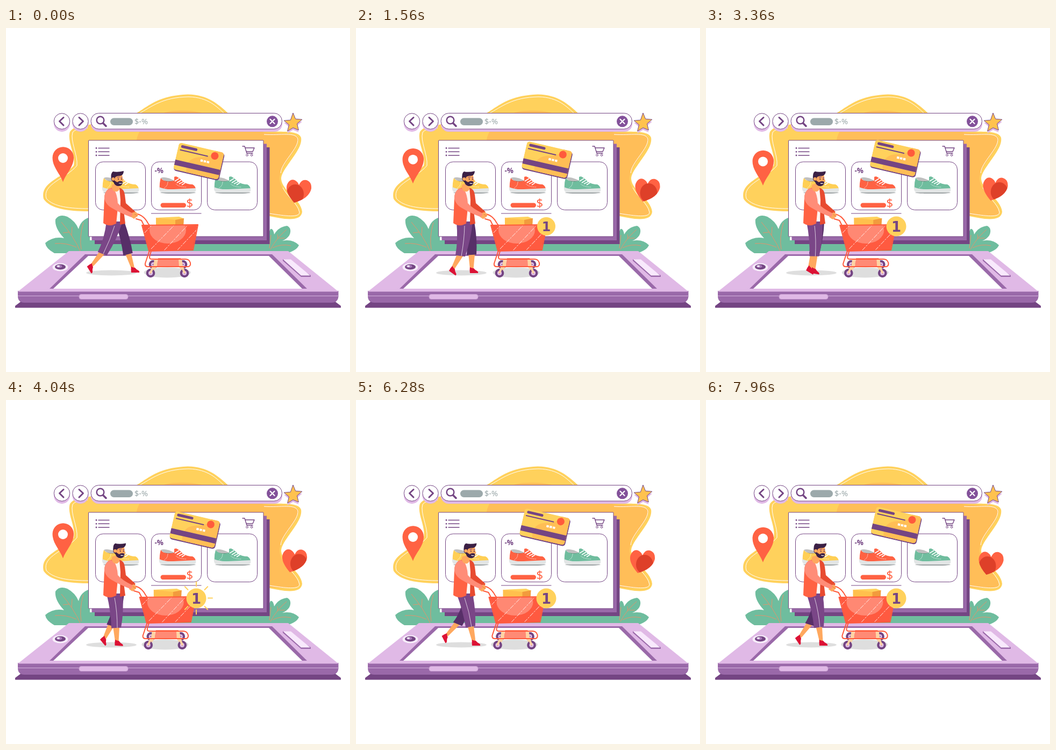
An HTML page for the animation above (8000 ms loop, 640 by 640 pixels).

```html
<!DOCTYPE html>
<html lang="en">
<head>
<meta charset="utf-8">
<title>Online shopping</title>
<style>
html,body{margin:0;width:100%;height:100%;overflow:hidden;background:#fff}
svg{display:block;width:100%;height:100%}
text{font-family:"Noto Sans","Open Sans",sans-serif}
.line{fill:none;stroke:#744583;stroke-linecap:round;stroke-linejoin:round}
.box{fill:#fff;stroke:#744583}
.lilac{fill:#e0b9e6}.mid{fill:#9a69a9}.deep{fill:#744583}
.red{fill:#ff6243}.skin{fill:#ffa85e}.hair{fill:#3b2045}
.tube{fill:none;stroke:#ff5a3c;stroke-width:2;stroke-linejoin:round;stroke-linecap:round}
.thin{fill:none;stroke:#fff;stroke-width:1}
.vein{fill:none;stroke:#e5936c;stroke-width:1}
</style>
</head>
<body>
<svg viewBox="0 0 640 640">
<defs>
  <g id="sneaker">
    <ellipse cx="320" cy="306.5" rx="33" ry="1.6" fill="#9aa0a2"/>
    <path d="M288 279Q294 288 313 284L313 277Q317 275 320 278Q325 281 329 286Q337 291 347 291Q353 294 353 301L286 300Q285 289 288 279Z" fill="currentColor"/>
    <path d="M288 279Q296 275 313 284Q298 290 288 279Z" fill="#000" opacity=".25"/>
    <path d="M285 296Q296 301 312 300Q332 299 353 298Q355 306 347 306H291Q284 305 285 296Z" fill="#e2e5e5"/>
    <path d="M314 285l8-5M318 288l8-5M322 290l8-4M327 292l6-4" stroke="#fff" stroke-width="1.6"/>
    <path d="M301 286Q301 294 294 298M316 290Q322 296 336 296" class="thin" stroke-dasharray="2 1" opacity=".75"/>
  </g>
  <path id="star" d="M534 158l4.6 11.2 12.2 1-9.3 7.9 2.9 11.8L534 185.600l-10.400 6.300 2.900-11.800-9.300-7.900 12.200-1Z"/>
  <g id="wheel">
    <circle r="8.300" class="deep"/><circle r="4" fill="#e6c6ec"/><circle r="1.700" class="mid"/>
  </g>
  <path id="foot" d="M-3-3Q0-1 4-1Q7 3 11 4.500Q13 6 12 8H-3Q-4 2-3-3Z" fill="#dc1235"/>
  <path id="heartShape" d="M536 325Q518 304 523 291Q528 280 537 283Q543 286 545 292Q550 281 559 283Q569 286 568 299Q564 317 536 325Z"/>
  <clipPath id="heartClip"><use href="#heartShape"/></clipPath>
  <clipPath id="cardClip"><rect x="-43" y="-25.500" width="86" height="51" rx="5"/></clipPath>
  <clipPath id="basketClip"><path d="M254 368L356 367L347 413L267 415Z"/></clipPath>
</defs>

<!-- backdrop -->
<path fill="#ffd15c" d="M240 160C268 144 282 126 338 123.500C376 124 395 142 415 160L480 192C514 194 544 190 549 204C553 228 511 262 512 281C514 304 549 318 551 342C549 361 518 356 490 350L154 341C114 341 82 336 70 318C62 287 108 277 126 256C130 235 113 211 119 193Q126 182 150 181Z"/>
<path fill="#ffbe58" d="M243 208C248 180 280 154 320 154C350 153 366 158 390 165L480 194C510 197 541 194 545 206C543 229 510 254 509 280C510 306 541 323 546 343C546 352 520 351 490 348L260 341Z"/>
<path class="thin" d="M246 160C272 146 290 129 340 128C376 129 392 146 407 160M480 198C512 200 538 193 543 206C545 224 512 250 511 270M515 297C523 314 543 326 546 343C546 353 520 350 490 345M154 336C120 336 88 333 75 317C67 290 112 280 132 256C134 236 119 211 124 194Q129 187 152 186"/>
<g fill="#6fbd9e">
  <rect x="130" y="395" width="375" height="24"/>
  <path d="M150 419H90Q74 410 73 400Q88 387 108 391Q90 372 92 356Q99 345 114 351Q129 359 135 374Q139 357 156 352V419Z"/>
  <path d="M486 419V387L492 374Q497 372 499 384Q507 370 523 368Q533 373 527 386Q522 393 514 396Q533 392 545 404Q541 414 522 419Z"/>
</g>
<path class="vein" d="M138 415Q126 388 103 361M140 412Q136 390 144 362M131 408Q112 399 91 401M122 386l1-16M117 380l-11 1M492 412Q503 391 522 375M496 409Q512 401 530 405M506 393l-1-9M508 391l11 0M490 410l3-25"/>

<!-- address bar -->
<g class="lilac">
  <circle cx="104" cy="178" r="15"/><circle cx="138.500" cy="178" r="15"/>
  <rect x="158" y="164" width="356" height="29" rx="14.500"/>
  <use href="#star" y="4"/>
</g>
<g class="box">
  <circle cx="104" cy="173.500" r="14.700"/><circle cx="138.500" cy="173.500" r="14.700"/>
  <rect x="158" y="158.500" width="355.500" height="29.500" rx="14.700"/>
</g>
<use href="#star" fill="#ffc24f" stroke="#744583"/>
<path class="line" stroke-width="3" d="M107 166.500L99.500 173.500L107 181M136 166.500L143.500 173.500L136 181"/>
<circle class="line" cx="175.500" cy="171.500" r="6.800" stroke-width="2.500"/>
<path class="line" stroke-width="3.500" d="M181 177.500L186 182.500"/>
<rect x="194" y="167.500" width="42" height="13.500" rx="6.700" fill="#9ca9ab"/>
<text x="239" y="179" font-size="14.500" fill="#98a5a7">$-%</text>
<circle cx="495.500" cy="173.800" r="10.500" fill="#83519a"/>
<path d="M491.500 169.800l8 8m0-8l-8 8" stroke="#fff" stroke-width="2.200" stroke-linecap="round"/>

<!-- shop window -->
<rect class="deep" x="165" y="222" width="325.500" height="180"/>
<rect class="mid" x="159.500" y="215.500" width="325.500" height="179.500"/>
<rect class="box" x="153.500" y="209" width="325.500" height="179" rx="1"/>
<path class="line" stroke-width="1.400" d="M172 223.500h20M172 230.300h20M172 237h20"/>
<path class="line" stroke-width="2.800" d="M168 223.500h0M168 230.300h0M168 237h0"/>
<path class="line" stroke-width="1.400" d="M440 220h4l4 13h11M445 223h17l-3 7h-12"/>
<circle class="line" cx="448.500" cy="236.500" r="1.800"/><circle class="line" cx="457" cy="236.500" r="1.800"/>
<g class="box">
  <rect x="166.500" y="249" width="93" height="89.500" rx="14"/>
  <rect x="270.500" y="249" width="93" height="89.500" rx="14"/>
  <rect x="374.500" y="249" width="93" height="89.500" rx="14"/>
  <path d="M270 345h93.500"/>
</g>
<use href="#sneaker" x="-106" color="#ffcf55"/>
<use href="#sneaker" color="#ff6243"/>
<use href="#sneaker" x="102" color="#6fbd9e"/>
<text x="276.500" y="270" font-size="13.500" font-weight="700" fill="#744583">-%</text>
<rect class="red" x="287.500" y="325.500" width="47.500" height="8.500" rx="4.200"/>
<text x="335.500" y="333" font-size="22" class="red">$</text>

<!-- tablet -->
<path class="deep" d="M29 508L17 517V520.500H623V517L611 508Z"/>
<path class="mid" d="M22 489H618.500V500Q617 511 606 511H34Q23 511 22 500Z"/>
<path class="lilac" d="M117 415H525L618.500 490.500H22Z"/>
<path class="mid" d="M147 421H495L560 485H81Z"/>
<path fill="#fff" d="M153 424H489L551 485H88Z"/>
<path d="M22 498.500H618" stroke="#d7b3df"/>
<rect class="lilac" x="136" y="495.500" width="91" height="9" rx="4" stroke="#c99fd2"/>
<ellipse cx="101" cy="445" rx="14.500" ry="7.500" fill="#f7eefa"/>
<ellipse class="deep" cx="101" cy="444.500" rx="10" ry="5"/>
<ellipse cx="99" cy="443.500" rx="5.500" ry="2.700" fill="#a87ab8"/><ellipse cx="97.500" cy="443" rx="2.500" ry="1.500" fill="#fff"/>
<path class="mid" d="M515 430V433L549 463H567V460Z"/>
<path fill="#f8e9fc" d="M515.500 430.500H530L566 460.500H549Z"/>
<ellipse cx="196" cy="455.500" rx="47" ry="5" fill="#dedede"/>

<!-- floating pieces -->
<g id="pin">
  <path class="red" d="M106 286.500C100 270 86.500 259 86.500 241A19.700 19.700 0 0 1 126 241C126 259 112 270 106 286.500Z"/>
  <circle cx="106" cy="242" r="9" fill="#fff"/>
</g>
<g id="heart">
  <use href="#heartShape" class="red"/>
  <g clip-path="url(#heartClip)"><ellipse id="shade" cy="309" rx="16" ry="18" fill="#de4029"/></g>
</g>
<g id="card">
  <rect class="deep" x="-42" y="-24" width="86.500" height="51.500" rx="5"/>
  <g clip-path="url(#cardClip)">
    <rect x="-43" y="-26" width="86" height="52" fill="#ffd15c"/>
    <path fill="#ffbe55" d="M-18 26Q-25-2 3-8Q22-12 26-26H43V26Z"/>
    <rect class="deep" x="-43" y="7" width="86" height="10"/>
  </g>
  <rect class="deep" x="-38" y="-22" width="31" height="5" rx="2.300"/>
  <path class="line" stroke-width="2" d="M-38-12.500H14"/>
  <circle cx="27" cy="-16" r="7" fill="#ff5a3c"/>
  <path d="M3-2h4.500m1.500 0h4.500m1.500 0h4.500" stroke="#fff" stroke-width="4"/>
</g>

<!-- trolley -->
<g id="cart">
  <ellipse cx="300" cy="455" rx="43.500" ry="9.500" fill="#dedede"/>
  <use href="#wheel" x="274" y="440"/><use href="#wheel" x="329" y="440"/>
  <path fill="#ff8a75" d="M283 428H325L327 444H280Z"/>
  <path fill="#ffd3a3" d="M276 430h6l-1 13-9 14-5-2 7-12ZM321 430h6l2 12 6 13-5 2-8-13Z"/>
  <use href="#wheel" x="269" y="456"/><use href="#wheel" x="332" y="456"/>
  <path d="M269 455l4-9M332 455l-4-9" stroke="#ffd3a3" stroke-width="4" stroke-linecap="round"/>
  <path class="tube" d="M267 414L259 438Q258 444 264 444H339Q344 443 343 437Q341 430 334 430H271Q265 430 268 422L270 415"/>
  <path fill="#ffd15c" d="M278 353L322 351L332 355L316 358Z"/>
  <path fill="#ffc04d" d="M279 353L316 357V372H279Z"/><path fill="#f29b3d" d="M315 357L331 354L330 372H315Z"/>
  <path fill="#ff5a40" d="M254 368L356 367L347 413L267 415Z"/>
  <g clip-path="url(#basketClip)">
    <ellipse cx="301" cy="376" rx="34" ry="25" fill="#ff8873"/>
    <path class="thin" opacity=".85" stroke-dasharray="9 2 3 2" d="M270 411L312 368M294 414L337 368M318 414L356 374M257 382L270 368"/>
  </g>
  <path class="tube" stroke-width="2.400" d="M253 367L357 366L348 413L266 415ZM239 345Q256 347 264 363L267 367M242 355L252 358L257 368"/>
</g>

<!-- shopper -->
<g id="man">
  <g id="farLeg"><path class="skin"/><path fill="#572f68"/><use href="#foot"/></g>
  <g id="nearLeg"><path class="skin"/><path fill="#7a4687"/><use href="#foot"/><path class="thin" stroke-width=".8" opacity=".7"/></g>
  <path fill="#fff4ef" d="M197 301L212 298L216 350L204 361L196 340Z"/>
  <path fill="#e84b30" d="M211 297Q220 300 221 310L223 326L241 342L236 350L219 340L222 364L212 366L213 320Z"/>
  <path class="red" d="M197 297Q184 300 183 316L181 363Q187 368 197 367L205 364L208 334L202 302Z"/>
  <g id="hand">
    <path class="skin" d="M233 344L241 342Q247 346 245 350L238 355L232 351Z"/>
    <path d="M239 346l5 3" stroke="#e9803f"/>
  </g>
  <path fill="#ff8d78" d="M195 298Q182 303 183 318Q186 329 197 335Q214 345 233 352L236 345Q217 336 208 326Q207 309 201 301Z"/>
  <path class="skin" d="M198 291L210 289L211 300Q207 307 200 303L196 297Z"/>
  <g id="head">
    <path class="skin" d="M198 272Q207 267 216 273L217 280L219 284L216 287Q214 294 207 292L199 285Z"/>
    <path class="hair" d="M196 283Q194 270 199 267Q207 269 219 266Q219 273 213 275Q205 275 203 278L202 284L207 287Q212 283 217 286Q217 293 211 294Q203 295 200 287Z"/>
    <circle class="skin" cx="199.500" cy="281" r="3"/>
    <path d="M207 278l4-1M214 278l2 0" class="line" stroke-width="1.200"/>
    <path d="M210 288.500q3 1.500 5 0" stroke="#fff" stroke-width="1.200" fill="none"/>
    <circle cx="209" cy="281" r="1" class="hair"/><circle cx="215" cy="281" r="1" class="hair"/>
  </g>
</g>

<path id="rays" stroke="#ffd15c" stroke-width="2" stroke-linecap="round"/>
<g id="badge">
  <circle r="18.500" fill="#ffd15c"/>
  <text y="10" text-anchor="middle" font-size="26" font-weight="700" class="deep" style="font-family:'DejaVu Sans',sans-serif">1</text>
</g>
</svg>
<script>
const $ = id => document.getElementById(id);
const times = [0, 1560, 2680, 4040, 5160, 6280, 7960];

// Smooth curve through one value per key time
function curve(v) {
  const slope = i => {
    const a = Math.max(i - 1, 0), b = Math.min(i + 1, v.length - 1);
    return (v[b] - v[a]) / (times[b] - times[a]);
  };
  return t => {
    let i = 0;
    while (i < 5 && t > times[i + 1]) i++;
    const h = times[i + 1] - times[i], u = Math.min((t - times[i]) / h, 1), w = 1 - u;
    return v[i] * w * w * (1 + 2 * u) + v[i + 1] * u * u * (3 - 2 * u)
      + h * u * w * (slope(i) * w - slope(i + 1) * u);
  };
}
function ramp(t, points) {
  for (let i = 1; i < points.length; i++) {
    const [a, x] = points[i - 1], [b, y] = points[i];
    if (t < b) return x + (y - x) * Math.max(0, (t - a) / (b - a));
  }
  return points[points.length - 1][1];
}
const move = (id, x, y, rest = '') => $(id).setAttribute('transform', `translate(${x} ${y}) ${rest}`);

const pinY = curve([0, 2.7, 5, 8, 10.5, 13, 15.5]);
const heartX = curve([0, -2.5, -5, -8, -10, -12, -14.5]);
const heartY = curve([0, -2, -3.5, -4.5, -4.5, -3, 0]);
const shadeX = curve([538, 547, 551, 553, 553, 549, 538]);
const cardX = curve([358.5, 355, 352.7, 351, 350.3, 351, 353.5]);
const cardY = curve([247.5, 245, 243, 241, 238.7, 235.7, 232.5]);
const cartX = curve([0, -2, -3.2, -4.2, -5, -5.5, -5.5]);
const headX = curve([0, 1.5, 2.5, 3.2, 3.8, 4.2, 4.1]);

const legs = [
  { id: 'farLeg', hips: [203, 220],
    cuff: [curve([227, 215, 206, 196, 192, 189, 193]), curve([421, 422, 422, 420, 418, 417, 418])],
    ankle: [curve([236, 215, 203, 183, 173, 168, 174]), curve([447, 448, 448, 443, 440, 438, 441])],
    turn: curve([0, 0, 12, 50, 58, 63, 56]) },
  { id: 'nearLeg', hips: [187, 217],
    cuff: [curve([179, 194, 198, 205, 210, 213, 210]), curve([420, 424, 425, 424, 423, 422, 423])],
    ankle: [curve([159, 180, 193, 206, 214, 219, 214]), curve([442, 447, 448, 449, 449, 449, 449])],
    turn: curve([58, 35, 18, 4, 0, 0, 0]) }
];

function drawLeg({ id, hips: [l, r], cuff, ankle, turn }, t) {
  const [cx, cy] = cuff.map(f => f(t)), [ax, ay] = ankle.map(f => f(t));
  const [shin, trouser, foot, seam] = $(id).children;
  const dx = cx - (l + r) / 2, dy = cy - 362, n = Math.hypot(dx, dy);
  const px = 9 * dy / n, py = -9 * dx / n;
  const knee = (hip, end) => `${(hip + end) / 2 + 4} 394`;
  shin.setAttribute('d', `M${cx - 6} ${cy - 3}L${cx + 6} ${cy - 1}L${ax + 3.5} ${ay + 1}L${ax - 3} ${ay}Z`);
  trouser.setAttribute('d', `M${l} 360Q${knee(l, cx - px)} ${cx - px} ${cy - py}`
    + `L${cx + px} ${cy + py}Q${knee(r, cx + px)} ${r} 360Z`);
  foot.setAttribute('transform', `translate(${ax} ${ay}) rotate(${turn(t)})`);
  if (seam) seam.setAttribute('d', `M202 368Q${knee(201, cx)} ${cx + 2} ${cy}`);
}

function draw(t) {
  move('pin', 0, pinY(t));
  move('heart', heartX(t), heartY(t));
  $('shade').setAttribute('cx', shadeX(t));
  move('card', cardX(t), cardY(t), 'rotate(13)');
  move('cart', cartX(t), 0);
  move('hand', cartX(t) * .7, -cartX(t) * .25);
  move('head', headX(t), 0, `rotate(${headX(t) * .6} 206 295)`);
  legs.forEach(leg => drawLeg(leg, t));

  const size = ramp(t, [[1050, 0], [1560, 17], [2250, 20.5], [2680, 20.5], [3300, 18.5]]);
  move('badge', 354, 369, `scale(${size / 18.5})`);

  const inner = ramp(t, [[3400, 17], [4040, 22], [5160, 31], [5800, 37]]);
  const outer = inner + ramp(t, [[3400, 0], [4040, 8], [5160, 8], [5800, 0]]);
  let d = '';
  for (let k = -3; k < 4; k++) {
    const c = Math.cos(k * Math.PI / 4), s = Math.sin(k * Math.PI / 4);
    d += `M${354 + c * inner} ${368.5 + s * inner}L${354 + c * outer} ${368.5 + s * outer}`;
  }
  $('rays').setAttribute('d', t > 3400 && t < 5800 ? d : '');
}

const start = performance.now();
function tick() {
  draw((performance.now() - start) % 8000);
  requestAnimationFrame(tick);
}
tick();
</script>
</body>
</html>
```
